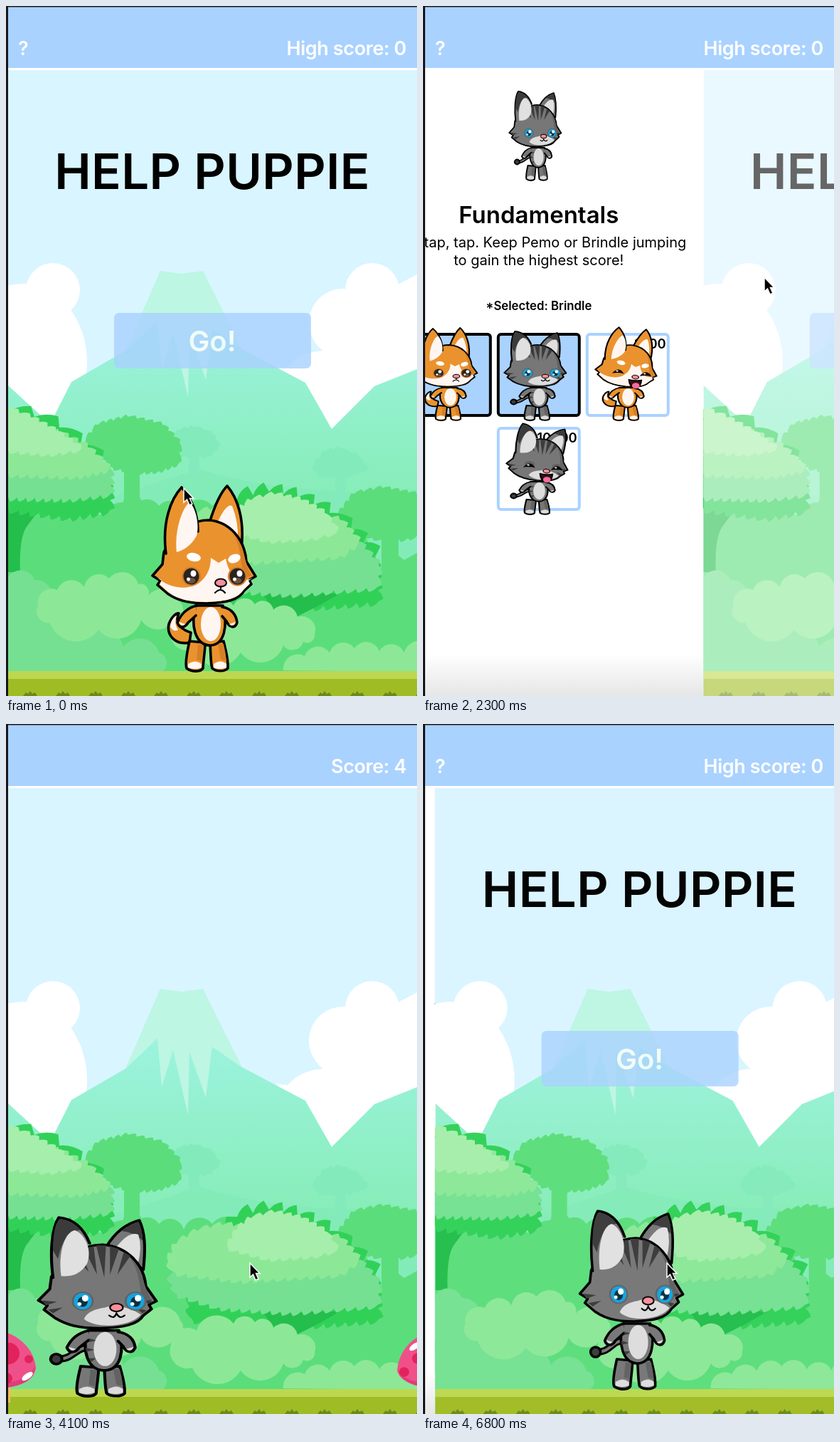
Write an HTML page that moves like this. It is 578 px wide and 969 px high and loops after 6900 ms.

```html
<!DOCTYPE html>
<html lang="en">
<head>
<meta charset="utf-8">
<title>Jumping pets</title>
<style>
html, body { margin: 0; width: 100%; height: 100%; overflow: hidden; background: #fff; }
svg { display: block; width: 100vw; height: 100vh; font-family: Inter, Roboto, Arial, sans-serif; }
.o { stroke: #000; stroke-width: 3.6; stroke-linejoin: round; stroke-linecap: round; }
.b { font-weight: 600; }
</style>
</head>
<body>
<script>
const clamp = v => Math.max(0, Math.min(1, v));
const inOut = v => (v = clamp(v)) < .5 ? 2 * v * v : 1 - 2 * (1 - v) ** 2;
const points = s => s.split(' ').map(p => p.split(',').map(Number));
const P = (d, fill, more = '') => `<path d="${d}" fill="${fill}" ${more}/>`;
const E = (x, y, rx, ry, fill, turn = 0, more = '') =>
  `<ellipse cx="${x}" cy="${y}" rx="${rx}" ry="${ry}" fill="${fill}" transform="rotate(${turn} ${x} ${y})" ${more}/>`;
const R = (x, y, w, h, fill, more = '') =>
  `<rect x="${x}" y="${y}" width="${w}" height="${h}" fill="${fill}" ${more}/>`;
const T = (x, y, size, text, more = '') => `<text x="${x}" y="${y}" font-size="${size}" ${more}>${text}</text>`;
const line = (d, width, color = '#000') =>
  P(d, 'none', `stroke="${color}" stroke-width="${width}" stroke-linecap="round"`);
const out = 'class="o"', mid = 'text-anchor="middle"', end = 'text-anchor="end"';

// Leafy shape: a clockwise polygon whose edges carry pointed teeth
function leaf(s, fill, size = 13, h = 6) {
  const p = points(s);
  let d = 'M' + p[0];
  p.forEach(([x, y], i) => {
    const [u, v] = p[(i + 1) % p.length], len = Math.hypot(u - x, v - y);
    const n = Math.max(1, Math.round(len / size)), dx = (u - x) / n, dy = (v - y) / n;
    const nx = (v - y) / len * h, ny = (x - u) / len * h;
    for (let k = 0; k < n; k++) {
      const a = x + dx * k, b = y + dy * k;
      d += `Q${a + dx * .3 + nx * .8} ${b + dy * .3 + ny * .8} ${a + dx * .8 + nx} ${b + dy * .8 + ny}L${a + dx} ${b + dy}`;
    }
  });
  return P(d + 'Z', fill);
}

// Bushy shape: round bumps between points, then a plain closing path
function puff(s, fill, close) {
  const p = points(s);
  if (!close) p.push(p[0]);
  let d = 'M' + p[0];
  for (let i = 1; i < p.length; i++) {
    const r = Math.hypot(p[i][0] - p[i - 1][0], p[i][1] - p[i - 1][1]) * .56;
    d += `A${r} ${r} 0 0 1 ${p[i]}`;
  }
  return P(d + (close || 'Z'), fill);
}

const pale = '#a6eeac', light = '#8ce897', soft = '#75e092', green = '#5cdd7c', deep = '#31d158', dark = '#24be4c';

function scenery() {
  let tufts = '';
  for (let x = 24; x < 578; x += 46) tufts += `M${x} 969l4-5 3 2 3-4 3 4 4-2 3 5z`;
  return R(3, 90, 575, 879, '#d9f5ff')
    + E(66, 399, 38, 38, '#fff') + E(24, 500, 90, 110, '#fff') + P('M3 392H32V520H108V590H3Z', '#fff')
    + E(515, 399, 38, 38, '#fff') + E(474, 445, 48, 48, '#fff') + E(450, 530, 62, 46, '#fff')
    + P('M380 505L430 512L480 430L553 390L578 377V600H440Z', '#fff')
    + P('M3 533L62 587L92 528L168 484L213 441L290 453L332 482L421 529L458 594L518 534L578 510V969H3Z', 'url(#hill)')
    + P('M217 372L247 376L277 372L332 482L290 453L281 525L258 460L256 549L235 458L219 510L213 441L168 484Z', '#bdf6e3')
    + P('M270 650Q400 690 578 680V780H150V690Z', '#83ebb8')
    + leaf('228,612 245,595 264,591 290,600 300,618 285,632 240,632', '#83ebbb', 12, 3)
    + P('M257 630H272V660H257Z', '#83ebbb')
    + leaf('432,645 450,625 470,621 495,632 509,650 480,661 440,660', '#83ebbb', 12, 3)
    + P('M463 658H478V690L490 697H450L463 690Z', '#83ebbb')
    + leaf('112,610 130,588 172,577 220,588 244,613 243,642 215,653 185,655 150,648', green, 12, 4)
    + P('M166 650H188V690Q196 704 215 708H145Q166 704 166 690Z', green)
    + puff('140,715 180,705 215,702 250,710 290,702 335,710', green, 'L500 735L528 790V740H552V772L560 778L578 768V969H3V700Z')
    + leaf('467,715 490,685 530,677 590,688 590,742 540,752 478,738', green, 12, 4)
    + P('M3 695H56L30 730Q18 745 20 795H3Z', dark)
    + leaf('3,570 40,577 75,592 105,616 135,640', deep, 26, 14)
    + leaf('3,640 130,640 146,680 146,708 90,718 3,706', deep, 15, 7)
    + leaf('3,645 147,650 147,685 90,692 3,690', soft)
    + leaf('3,590 75,600 115,620 145,650 100,660 3,657', light)
    + leaf('3,566 35,578 70,597 106,622 60,629 3,624', pale, 15, 5)
    + leaf('312,720 325,692 370,682 410,690 455,712 485,735 520,772', deep, 26, 14)
    + leaf('260,800 520,775 524,836 400,846 262,836 258,818', deep, 16, 7)
    + P('M360 825H470L440 842L400 862L375 845Z', dark)
    + leaf('230,775 380,745 495,752 524,785 522,816 400,826 300,819 240,800', soft, 15)
    + leaf('228,755 240,730 270,712 305,704 470,722 496,752 470,772 330,781 238,770', light, 15)
    + leaf('312,735 325,710 345,694 378,686 415,694 448,712 466,738 430,747 370,751', pale, 15, 5)
    + puff('3,802 40,806 62,846 110,885 165,900 215,908 220,935', soft, 'H3Z')
    + puff('45,842 72,820 110,816 145,804 186,812 200,828 245,838 240,858 190,862 130,876 62,866', light)
    + puff('232,872 268,852 320,842 350,840 376,848 410,858 434,882 418,893 390,898 330,908 262,904', light)
    + puff('390,933 420,913 455,908 490,902 525,906 560,908 600,900', light, 'V935Z')
    + R(3, 934, 575, 11, '#bcd850') + R(3, 945, 575, 24, '#a0bc25') + P(tufts, '#6b8a1a');
}

function pet(cat, laugh) {
  const fur = cat ? '#777' : '#ea932e', shade = cat ? '#626262' : '#d67f26';
  const white = cat ? '#dcdcdc' : '#fff6f2', ink = '#3b3b3b';
  const tail = cat
    ? line('M268 866C250 866 250 882 230 882', 10) + line('M268 866C250 866 250 882 230 882', 4, fur) + E(228, 882, 7, 7, ink, 0, out)
    : P('M258 894C236 898 226 882 229 868C233 857 240 852 243 853C238 864 242 874 260 880Z', fur, out)
      + P('M231 872C232 861 238 857 240 856C237 864 238 870 242 876Q236 880 231 872Z', white);
  const limbs = P('M258 892C254 910 252 925 254 930C262 936 274 935 277 930C278 915 280 905 280 894Z', fur, out)
    + P('M287 894C288 912 288 925 290 930C295 935 308 935 312 930C313 918 309 905 306 892Z', fur, out)
    + P('M270 896L278 898L275 920L268 918ZM298 896L306 896Q309 908 310 920L302 918Z', shade)
    + P('M256 924Q266 917 275 924V929Q265 933 256 929ZM292 924Q302 917 310 924V929Q300 933 292 929Z', white)
    + P('M267 842C259 870 266 897 287 898C308 897 312 870 305 842Z', fur, out)
    + (cat ? P('M264 852l14 4-14 3zM264 866l11 3-10 3zM268 881l9 0-6 5z', ink) : '')
    + E(288, 868, 14, 24, white)
    + P('M268 842C252 846 245 856 241 866C244 875 252 873 256 866L267 856', fur, out)
    + P('M304 844C318 846 324 856 325 866C322 875 314 873 310 864L304 857', fur, out)
    + P('M243 865l9 3q-5 5-9-3zM323 865l-9 3q5 5 9-3z', white);
  const rightEar = cat
    ? P('M290 724C302 702 316 692 330 688C337 705 338 725 335 757Z', fur, out)
      + P('M308 703Q318 694 329 690Q334 700 334 716Q322 704 308 703Z', ink) + P('M302 725Q318 702 329 708Q334 726 328 750Z', '#e0e0e0')
    : P('M286 726C294 700 303 682 311 674C325 690 336 720 331 762Z', fur, out) + P('M298 724Q310 698 318 702Q327 725 326 748Z', white);
  const leftEar = cat
    ? P('M224 768C220 735 222 700 231 684C250 686 262 700 269 720', fur, out)
      + P('M224 730C224 705 227 692 232 686Q248 688 258 702Q238 700 230 742Z', ink)
      + P('M234 766C230 735 238 704 251 702C264 708 272 730 266 748Q256 768 234 766Z', '#e0e0e0')
    : P('M225 769C219 725 232 692 247 676C260 690 270 712 270 738', fur, out)
      + P('M240 767C236 735 250 700 259 697C268 708 272 730 268 744Q258 762 240 767Z', white);
  const skull = P('M222 767C238 736 262 722 285 722C315 724 336 750 338 780L351 801L342 806L345 812L335 821C328 834 310 838 282 839C255 839 240 834 227 825L213 813L217 807L206 800L220 784Z', fur, out)
    + P('M316 737C337 756 334 784 346 800L336 803C328 786 334 760 316 737Z', shade);
  const marks = cat
    ? P('M262 727l12-3 4 40zM277 723h12l-2 45zM294 724l11 4-11 36zM311 732l8 6-16 26zM247 736l10-6 11 30z', ink)
      + P('M211 800l18 2-14 5zM218 813l18-3-12 8zM346 800l-14 0 10 5zM339 814l-14-4 9 8z', ink)
      + P('M262 826C266 816 276 812 288 810C300 805 320 810 332 820C318 838 276 840 262 826Z', '#dcdcdc')
    : P('M212 802C232 820 258 820 272 810C284 800 288 788 288 775L299 782L309 776C312 792 322 815 347 803L341 807L343 811L334 820C324 834 305 836 282 837C255 837 240 832 228 823L216 812L219 806Z', white)
      + E(264, 774, 10, 6, '#fff', 12) + E(321, 776, 9, 6, '#fff', -20);
  const eye = x => laugh
    ? (cat ? E(x, 796, 12, 9, shade) : '') + P(`M${x - 14} 806Q${x} 782 ${x + 14} 804Q${x} 801 ${x - 14} 806Z`, '#000') + E(x - 3, 798, 3, 2, '#fff')
    : E(x, 801, 13.5, 13.5, shade) + E(x, 801, 11, 11.5, cat ? '#14a3dd' : '#2a2320')
      + (cat ? E(x, 802, 6, 7, '#073042') : E(x, 807, 6, 4, '#6b5040')) + E(x + 3, 797, 4, 4.5, '#fff') + E(x - 4, 805, 2.5, 2.5, '#fff');
  const nose = E(302, 810, 8, 5.5, '#f98f9c', 0, 'stroke="#000" stroke-width="2"');
  const mouth = laugh
    ? P('M288 819Q302 822 317 817Q318 838 306 842Q292 840 288 819Z', '#3a1015', out) + E(306, 834, 9, 8, '#f66a9c')
    : line(cat ? 'M293 821Q299 827 302 818Q306 827 312 821' : 'M302 815V818M294 824Q302 816 308 824', 2.2);
  return tail + limbs + `<g transform="rotate(${laugh ? 7 : 0} 285 835)">`
    + rightEar + skull + marks + leftEar + eye(260.5) + eye(325.5) + nose + mouth + '</g>';
}

function fallenCat() {
  const fur = '#777', ink = '#3b3b3b', plus = (x, y) =>
    E(x, y, 13, 13, '#fff', 0, out) + line(`M${x - 7} ${y}h14M${x} ${y - 7}v14`, 5);
  const tail = 'M256 930C254 900 236 906 226 914L212 917';
  return '<g transform="translate(-3 0)">'
    + line(tail, 17) + line(tail, 10, fur) + E(211, 916, 9, 8, ink, 0, out)
    + P('M236 985C240 935 262 915 288 924L330 985Z', fur, out)
    + P('M254 926l8 18 4-20zM270 922l6 18 7-18z', ink) + E(292, 965, 18, 14, '#dcdcdc')
    + P('M252 934C225 930 198 934 199 950C200 966 225 968 248 967Z', fur, out) + E(207, 950, 6, 11, '#b9b9b9')
    + P('M230 985Q240 960 272 966V985Z', fur, out)
    + P('M422 874C450 886 464 912 461 931C446 936 434 935 424 926Z', fur, out) + P('M436 890Q456 905 457 927L438 929Z', ink)
    + P('M262 860L297 851L375 834C412 845 432 880 431 908C430 940 424 960 422 985H335C300 962 272 930 266 890Z', fur, out)
    + P('M380 838l14 6-22 36zM400 849l11 8-33 36zM416 865l7 12-40 25zM427 889l2 13-38 11zM268 866l20 10-18 4zM270 893l18 2-14 8z', ink)
    + P('M318 962C322 934 352 924 374 934C384 946 374 975 366 985H330Z', '#dcdcdc')
    + P('M297 853C286 815 290 785 299 780C330 785 362 808 378 834C366 860 330 866 297 853Z', fur, out)
    + P('M296 836C290 810 292 790 300 783Q335 792 358 815Q322 796 308 806Q302 815 303 845Z', ink)
    + P('M307 848C300 818 308 802 320 807C345 820 362 842 366 852Q340 866 307 848Z', '#e0e0e0')
    + E(318, 899, 20, 18, '#626262') + E(389, 956, 19, 18, '#626262') + plus(320, 901) + plus(390, 957)
    + E(303, 906, 12, 7, '#d6effb', 38) + E(357, 944, 11, 8, '#f98f9c', 35, 'stroke="#000" stroke-width="3"')
    + P('M314 969Q332 948 352 964L345 985H318Z', '#3a1015', out) + E(332, 970, 13, 9, '#f0528c') + '</g>';
}

const mushroom = R(264, 928, 72, 25, '#fbd296') + R(308, 928, 28, 25, '#f5b960')
  + P('M233 908C236 872 266 850 303 850C342 850 370 875 372 905C368 926 345 933 303 934C262 933 238 926 233 908Z', '#ef5089')
  + P('M234 905C240 922 262 927 303 927C345 927 365 918 371 900C371 925 345 933 303 934C262 933 238 926 234 905Z', '#e03c78')
  + [[333, 884, 16], [287, 907, 13], [262, 891, 8], [331, 919, 8], [243, 910, 7], [312, 859, 4], [362, 892, 6], [296, 884, 4]]
    .map(([x, y, r]) => E(x, y, r, r * .95, '#e2225c')).join('')
  + E(287, 863, 18, 9, '#fff', -12) + E(258, 874, 9, 4, '#fff', -35) + E(360, 916, 9, 4, '#fff', -35);

const use = (id, x, y, sx, sy, more = '') =>
  `<use href="#${id}" transform="translate(${x} ${y}) scale(${sx} ${sy}) translate(-278.5 -674)" ${more}/>`;
const tile = (x, y, id, free, price = '') =>
  R(x + 2, y + 2, 114, 114, free ? '#aad2ff' : '#fff', `rx="4" stroke-width="4" stroke="${free ? '#000' : '#aad2ff'}"`)
  + T(x + 113, y + 22, 18.5, price, `class="b" ${end}`) + use(id, x + 54, y - 7, .6, .5);

const home = `<g id="main"><use href="#bg"/>`
  + T(290, 257, 69, 'HELP PUPPIE', `class="b" letter-spacing=".4" ${mid}`)
  + `<g opacity=".82">${R(152, 431, 277, 78, '#aad2ff', 'rx="7"')}${T(290, 485, 40, 'Go!', `class="b" fill="#fff" ${mid}`)}</g>`
  + use('dog', 278.5, 674, 1, 1, 'id="hero"') + R(3, 90, 575, 879, '#fff', 'id="veil"') + '</g>'
  + `<g id="drawer">${R(3, 90, 460, 879, '#fff')}${R(3, 910, 460, 59, 'url(#fade)')}`
  + use('dog', 227, 115, .505, .5, 'id="face"')
  + T(232, 305, 33, 'Fundamentals', `class="b" ${mid}`)
  + T(232, 339, 20, 'Tap, tap, tap. Keep Pemo or Brindle jumping', mid) + T(232, 364, 20, 'to gain the highest score!', mid)
  + T(232, 427, 16.8, '', `id="chosen" class="b" ${mid}`)
  + tile(48, 459, 'dog', 1) + tile(173, 459, 'cat', 1)
  + tile(298, 459, 'happyDog', 0, '1000') + tile(173, 591, 'happyCat', 0, '10000') + '</g>';

const screen = (id, body) => `<g id="${id}"><g clip-path="url(#frame)">${body}</g></g>`;
const grad = (id, y1, y2, a, b) => `<linearGradient id="${id}" gradientUnits="userSpaceOnUse" x1="0" x2="0" y1="${y1}" y2="${y2}"><stop stop-color="${a}"/><stop offset="1" stop-color="${b}"/></linearGradient>`;
const def = (id, body) => `<g id="${id}">${body}</g>`;
const bar = 'class="b" letter-spacing="-.4"';

document.body.innerHTML = `<svg viewBox="0 0 578 969" preserveAspectRatio="none"><defs>`
  + grad('hill', 440, 680, '#9df3df', '#87edb9') + grad('fade', 910, 969, '#fff', '#e6e6e6')
  + `<clipPath id="frame">${R(3, 87, 575, 882, '#000')}</clipPath>`
  + def('bg', scenery()) + def('dog', pet(0, 0)) + def('cat', pet(1, 0))
  + def('happyDog', pet(0, 1)) + def('happyCat', pet(1, 1)) + '</defs><g id="stage">'
  + screen('home', home)
  + screen('game', `<use href="#bg"/><g id="jumper">${use('cat', 128.5, 683, 1.144, 1.004)}</g>`
    + `<g id="shroom1">${mushroom}</g><g id="shroom2">${mushroom}</g>` + R(3, 90, 575, 879, '#000', 'id="dim"'))
  + screen('over', '<use href="#bg"/>' + fallenCat()
    + T(290, 138, 34, 'GAME OVER', `class="b" letter-spacing="-.7" ${mid}`)
    + T(18, 410, 34, 'Whoops, looks like you died. (TAP)', 'class="b" letter-spacing="-.95"')
    + T(18, 451, 34, 'anywhere to begin again!', 'class="b" letter-spacing="-.95"'))
  + '</g>' + R(0, 0, 578, 88, '#aad2ff') + R(0, 87, 578, 3, '#fff') + '<g fill="#fff">'
  + def('homeBar', T(17, 69, 27, '?', bar) + T(563, 69, 27, 'High score: 0', `${bar} ${end}`))
  + def('gameBar', T(563, 69, 27, '', `id="score" ${bar} ${end}`))
  + def('overBar', T(17, 69, 27, 'You Lost :(', bar) + T(563, 69, 27, 'Score: 1', `${bar} ${end}`)) + '</g>'
  + R(0, 0, 578, 1.5, '#18181a') + R(0, 0, 3, 969, '#18181a')
  + `<g id="cursor">${P('M0 0V20L4.5 16L8 24L12 22.3L8.5 14.5H14Z', '#000', 'stroke="#fff" stroke-width="1.5"')}</g></svg>`;

const $ = id => document.getElementById(id);
const move = (id, x, y = 0) => $(id).setAttribute('transform', `translate(${x} ${y})`);
const fade = (id, v) => $(id).setAttribute('opacity', v);

// Cursor stops: time, x, y
const stops = [[0, 250, 677], [250, 24, 56], [320, 24, 56], [700, 194, 473], [1500, 194, 473], [2100, 480, 381],
  [2350, 480, 381], [2650, 290, 466], [2800, 290, 466], [3300, 343, 757], [6900, 343, 757]];
function pointer(t) {
  const i = stops.findIndex(s => s[0] > t), [t0, x0, y0] = stops[i - 1], [t1, x1, y1] = stops[i];
  const k = inOut((t - t0) / (t1 - t0));
  return [x0 + (x1 - x0) * k, y0 + (y1 - y0) * k];
}

const W = 575, OPEN = 461, CRASH = 4925;
const push = (t, start) => (1 - clamp((t - start) / 650)) ** 4;
const jump = (t, start) => { const p = clamp((t - start) / 600); return 1000 * p * (1 - p); };

function draw(t) {
  const toGame = push(t, 2680), toOver = push(t, CRASH), toHome = push(t, 6150), again = t > 6000;
  const open = OPEN * (t < 1500 ? inOut((t - 300) / 365) : 1 - inOut((t - (again ? 6481 : 2200)) / 365));
  const under = v => -172 * (1 - v);
  if (again) $('stage').append($('home')); else $('stage').prepend($('home'));
  move('home', again ? W * toHome : under(toGame));
  move('game', W * toGame + under(toOver));
  move('over', W * toOver + under(toHome));
  move('main', open);
  move('drawer', open - OPEN);
  fade('veil', .4 * clamp(open / 390));
  fade('dim', .35 * (1 - toOver));

  const cat = t >= 1100;
  for (const id of ['hero', 'face']) $(id).setAttribute('href', cat ? '#cat' : '#dog');
  $('chosen').textContent = '*Selected: ' + (cat ? 'Brindle' : 'Pemo');

  const g = Math.min(t, CRASH), x = -.55 * (g - 3500);
  move('jumper', 0, -jump(g, 3500) - jump(g, 4435));
  move('shroom1', x);
  move('shroom2', x + 647);
  $('score').textContent = 'Score: ' + Math.max(0, Math.min(4, Math.floor((g - 2750) / 150)));

  fade('homeBar', again ? 1 - toHome : toGame);
  fade('gameBar', (1 - toGame) * toOver);
  fade('overBar', (1 - toOver) * toHome);
  move('cursor', ...pointer(t));
}

function tick() {
  draw(Math.floor(performance.now() % 6900 / 100) * 100);
  requestAnimationFrame(tick);
}
tick();
</script>
</body>
</html>
```
